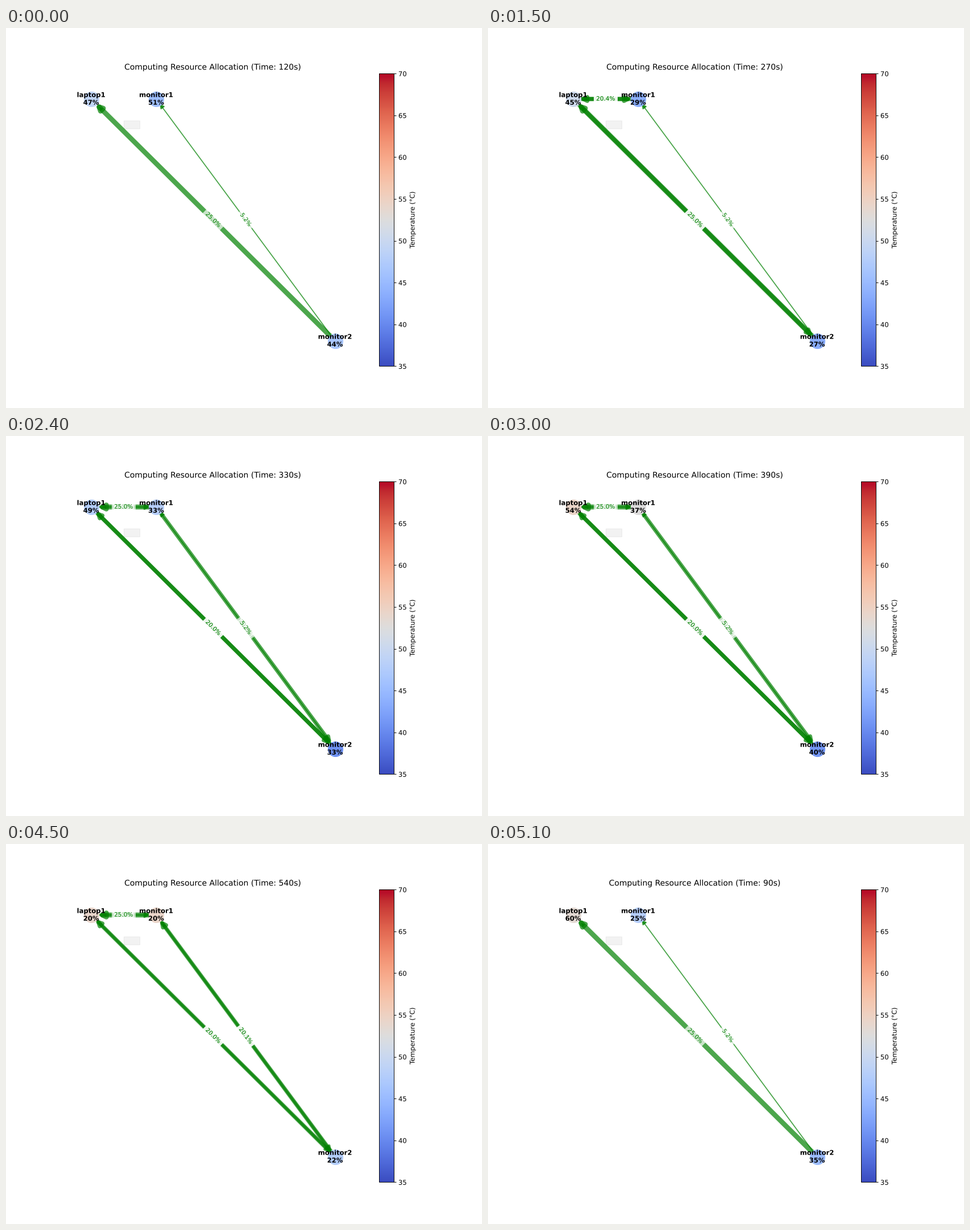
A matplotlib script for the animation above (5.4 s loop, 837 px wide and 669 px high).

```python
import math

import matplotlib.pyplot as plt
import numpy as np
from matplotlib import patheffects
from matplotlib.animation import FuncAnimation
from matplotlib.cm import ScalarMappable
from matplotlib.colors import Normalize
from matplotlib.patches import FancyArrowPatch, Rectangle

W, H, DPI = 837, 669, 83.7
plt.rcParams["font.family"] = "DejaVu Sans"
plt.rcParams["text.hinting"] = "none"
# Drawing text as paths places it between whole pixels.
plt.rcParams["path.effects"] = [patheffects.Normal()]

NODES = {"laptop1": (0, 1), "monitor1": (1, 1), "monitor2": (3.75, 0)}
L, M, N = NODES

# Snapshots play in alphabetical order of their time label.
TIMES = sorted(range(30, 541, 30), key=str)

# Load in percent, linear between a few key times
KEY_TIMES = [30, 90, 120, 210, 390, 480, 540]
KEY_LOADS = {
    L: [30, 60, 47, 40, 54, 45, 20],
    M: [39, 25, 51, 25, 37, 50, 20],
    N: [31, 35, 44, 20, 40, 43, 22],
}

# Temperature as a wave: mean, swing, time of a peak, period
WAVES = {L: (50.5, 4, 70, 160), M: (49, 7, 480, 540), N: (44, 3.5, 165, 375)}

# An allocation holds until a later one replaces it: time, from, to, percent
ALLOCATIONS = [
    (30, N, M, 13.8),
    (90, N, M, 5.2), (90, N, L, 25.0),
    (180, L, N, 20.0),
    (210, L, M, 20.4), (210, M, L, 20.4),
    (330, L, M, 9.5), (330, M, L, 25.0), (330, M, N, 20.1), (330, N, L, 20.0),
    (450, N, M, 20.1),
    (540, L, N, 13.0), (540, M, N, 12.5),
]

fig, ax = plt.subplots(figsize=((W + 0.01) / DPI, (H + 0.01) / DPI), dpi=DPI)
heat = ScalarMappable(Normalize(35, 70), "coolwarm")
fig.colorbar(heat, ax=ax, label="Temperature (°C)")


def load_at(node, time):
    return round(np.interp(time, KEY_TIMES, KEY_LOADS[node]))


def temperature_at(node, time):
    mean, swing, peak, period = WAVES[node]
    return mean + swing * math.cos(2 * math.pi * (time - peak) / period)


def edges_at(time):
    edges = {(a, b): share for first, a, b, share in ALLOCATIONS
             if first <= time}
    return sorted(edges.items())


def set_view(edges):
    """Fit the nodes, with extra room around the span of the edges."""
    linked = [NODES[name][0] for ends, _ in edges for name in ends]
    pad = 0.05 * (max(linked) - min(linked))
    low = min(0, min(linked) - pad)
    high = max(linked) + pad
    margin = 0.05 * (high - low)
    ax.set_xlim(low - margin, high + margin)
    ax.set_ylim(-0.105, 1.105)


def draw_arrow(start, end, share):
    gap = math.sqrt(300) / 2
    ax.add_patch(FancyArrowPatch(
        NODES[start], NODES[end], arrowstyle="-|>", mutation_scale=15,
        shrinkA=gap, shrinkB=gap, color="green", alpha=0.7,
        linewidth=0.3 * share, zorder=1))


def draw_share(start, end, share):
    ends = np.array(sorted((NODES[start], NODES[end])))
    dx, dy = np.diff(ax.transData.transform(ends), axis=0)[0]
    ax.text(*ends.mean(axis=0), f"{share:.1f}%", size=9, color="green",
            rotation=math.degrees(math.atan2(dy, dx)), ha="center",
            va="center", zorder=1,
            bbox=dict(facecolor="white", edgecolor="none", alpha=0.7))


def draw_node(name, time):
    x, y = NODES[name]
    color = heat.to_rgba(temperature_at(name, time))
    ax.scatter(x, y, s=500, color=color, zorder=2)
    ax.text(x, y, f"{name}\n{load_at(name, time)}%", size=10, weight="bold",
            ha="center", va="center", clip_on=True)


def draw(frame):
    time = TIMES[frame]
    edges = edges_at(time)
    ax.clear()
    ax.axis("off")
    set_view(edges)
    ax.set_title(f"Computing Resource Allocation (Time: {time}s)")
    ax.add_patch(Rectangle((0.5, 0.878), 0.25, 0.0325, color="gray",
                           alpha=0.1, zorder=0.5))
    for ends, share in edges:
        draw_arrow(*ends, share)
    for ends, share in edges:
        draw_share(*ends, share)
    for name in NODES:
        draw_node(name, time)
    return []


anim = FuncAnimation(fig, draw, frames=len(TIMES), interval=300, repeat=True)
plt.show()
```
